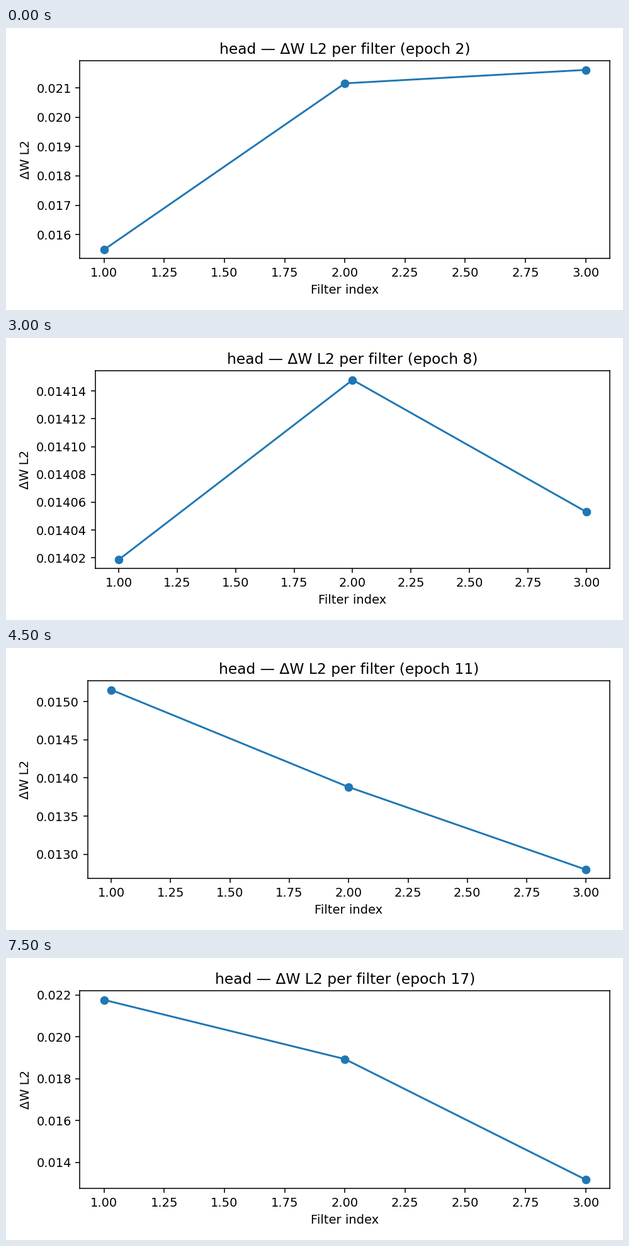
A matplotlib script that plays this animation: 980 by 448 pixels, repeating every 8 s.

```python
import matplotlib.pyplot as plt
import numpy as np
from matplotlib.animation import FuncAnimation

LAYOUT_DPI, DRAW_DPI = 100, 140
EPOCHS = range(2, 18)
FILTERS = (1, 2, 3)

# Turning points of each filter's weight change (x 1e-3); straight in between
KEY_EPOCHS = (2, 4, 6, 9, 11, 13, 17)
KEY_NORMS = (
    (15.485, 15.451, 14.432, 13.812, 15.153, 17.405, 21.768),
    (21.155, 18.717, 16.380, 13.032, 13.881, 15.069, 18.941),
    (21.614, 19.007, 16.545, 12.807, 12.800, 11.410, 13.180),
)

plt.rcParams["font.family"] = "DejaVu Sans"
fig = plt.figure(figsize=(7, 3.2), dpi=DRAW_DPI, facecolor="white")


def norms(epoch):
    return [np.interp(epoch, KEY_EPOCHS, keys) / 1000 for keys in KEY_NORMS]


def fit_layout():
    # Margins are measured at the base resolution, then drawn larger
    fig.set_dpi(LAYOUT_DPI)
    fig.tight_layout()
    fig.set_dpi(DRAW_DPI)


def draw(epoch):
    fig.clear()
    fig.subplots_adjust(left=0.125, right=0.9, bottom=0.11, top=0.88)
    ax = fig.add_subplot()
    ax.plot(FILTERS, norms(epoch), marker="o", color="#1f77b4")
    ax.set_title(f"head — ΔW L2 per filter (epoch {epoch})")
    ax.set_xlabel("Filter index")
    ax.set_ylabel("ΔW L2")
    fit_layout()
    return ax.lines


anim = FuncAnimation(fig, draw, frames=EPOCHS, interval=500,
                     repeat=True, repeat_delay=0, blit=False)
plt.show()
```
